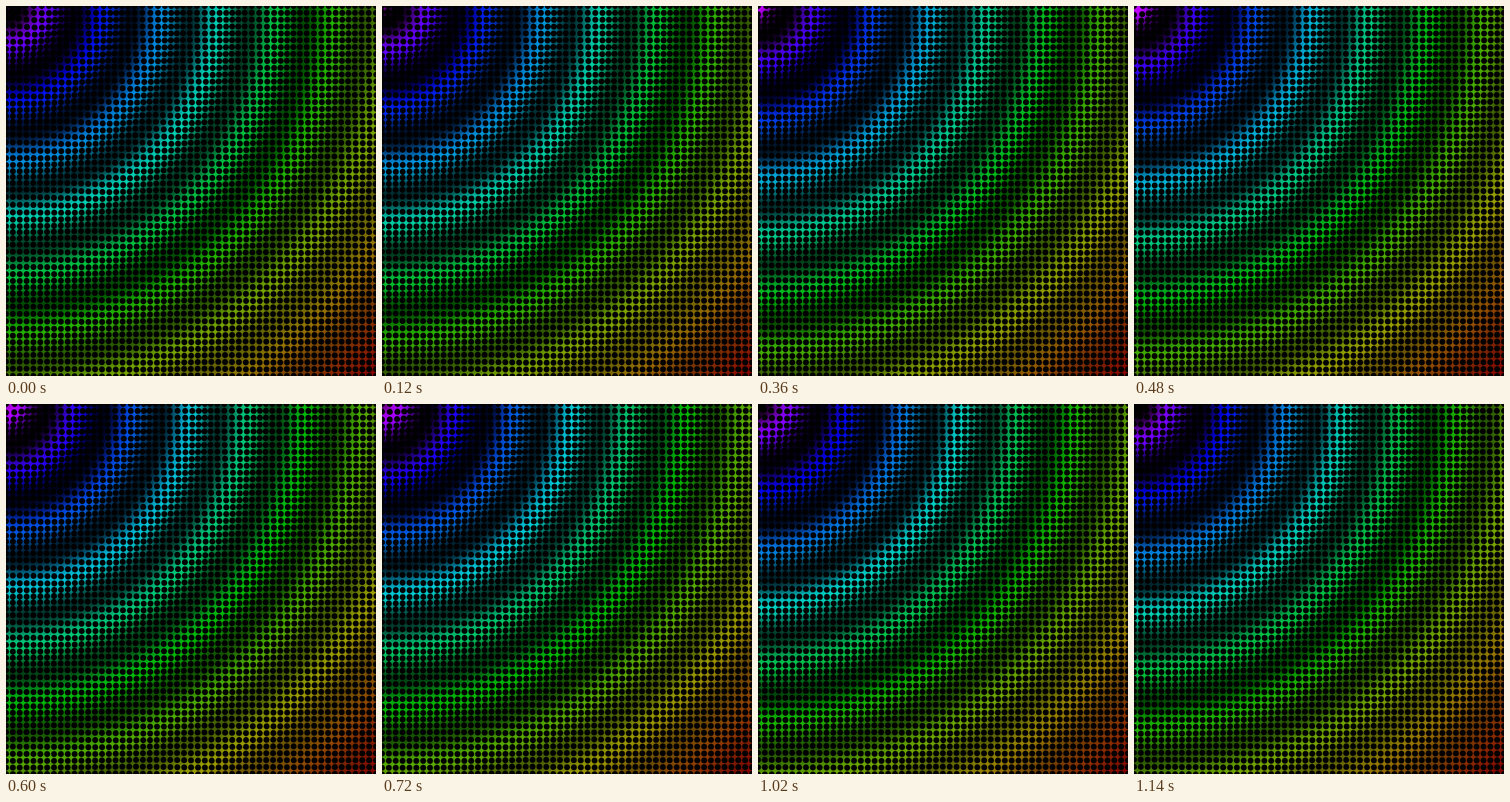
Write an HTML page with a canvas that moves like this. It is 540 px wide and 540 px high and loops after 1200 ms.

```html
<!DOCTYPE html>
<html lang="en">
<head>
<meta charset="utf-8">
<title>Rainbow ripples</title>
<style>
html, body { margin: 0; width: 100%; height: 100%; overflow: hidden; background: #000; }
canvas { display: block; width: 540px; height: 540px; }
</style>
</head>
<body>
<canvas id="stage" width="540" height="540"></canvas>
<script>
const SIZE = 540, LOOP = 1200, STEP = 60;
const CELL = 10, DOT = 4.4;          // black dot lattice
const WAVE = 84, CREST = 59;         // ring spacing, first crest
const PUSH = 3;                      // largest radial shift of a dot
const FAR = SIZE * Math.SQRT2, STOPS = 240;

const ctx = document.getElementById('stage').getContext('2d');

// Travelling wave that fades with distance from the corner
function ripple(r, time) {
  const turns = (r - CREST) / WAVE - time / LOOP;
  return (1 - r / FAR) * Math.cos(turns * 2 * Math.PI);
}

function paintRings(time) {
  const rings = ctx.createRadialGradient(0, 0, 0, 0, 0, FAR);
  for (let i = 0; i <= STOPS; i++) {
    const far = i / STOPS;
    const light = 25 + 25 * ripple(far * FAR, time);
    rings.addColorStop(far, `hsl(${288 * (1 - far)} 100% ${light}%)`);
  }
  ctx.fillStyle = rings;
  ctx.fillRect(0, 0, SIZE, SIZE);
}

function paintDots(time) {
  ctx.fillStyle = '#000';
  ctx.beginPath();
  for (let y = 0; y <= SIZE; y += CELL) {
    for (let x = 0; x <= SIZE; x += CELL) {
      const r = Math.hypot(x, y) || 1;
      const scale = 1 + PUSH * ripple(r, time) / r;
      const cx = x * scale, cy = y * scale;
      ctx.moveTo(cx + DOT, cy);
      ctx.arc(cx, cy, DOT, 0, 2 * Math.PI);
    }
  }
  ctx.fill();
}

let shown = -1;
function tick() {
  const step = Math.floor(performance.now() % LOOP / STEP);
  if (step !== shown) {
    shown = step;
    paintRings(step * STEP);
    paintDots(step * STEP);
  }
  requestAnimationFrame(tick);
}
tick();
</script>
</body>
</html>
```
